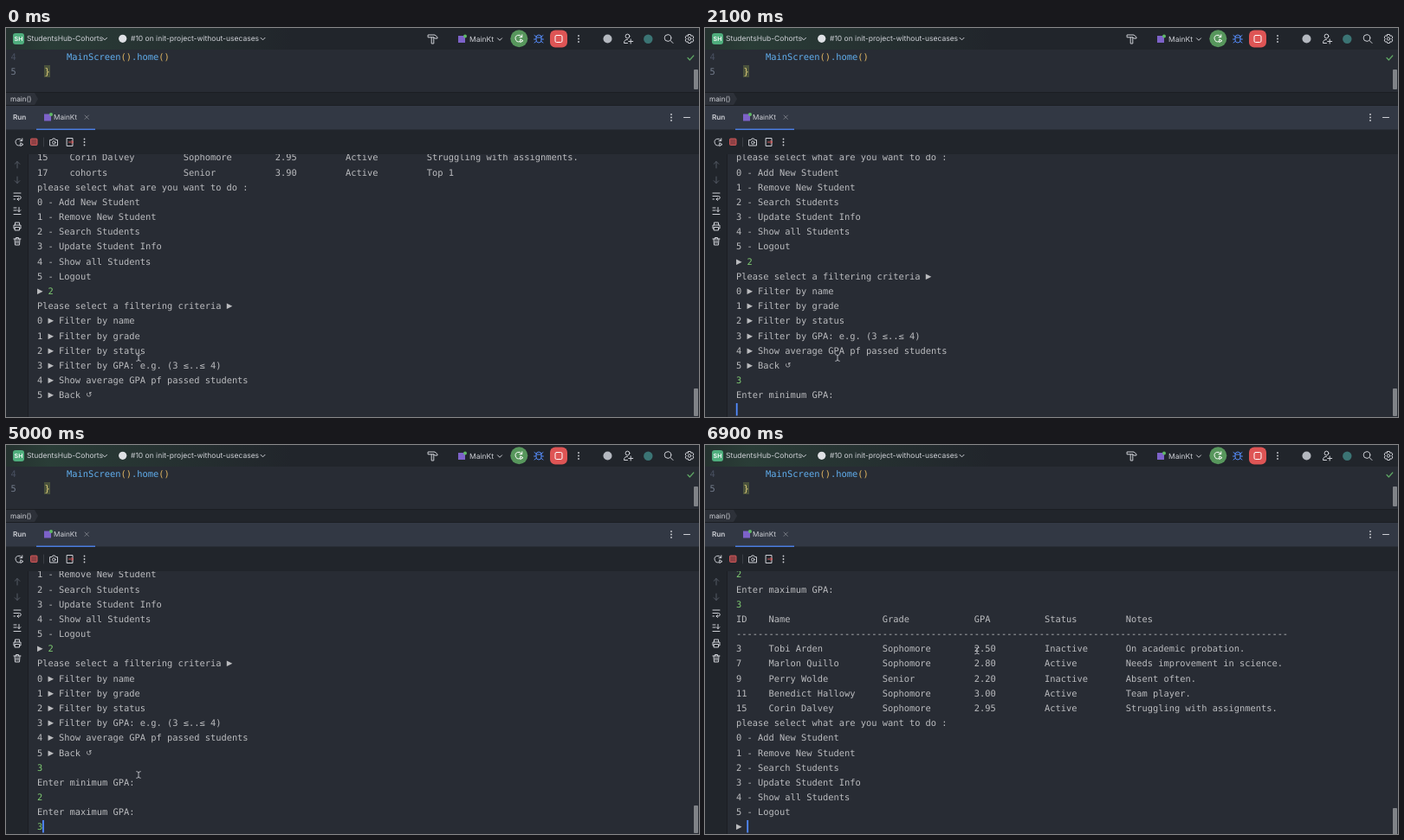
Animation, 800 px wide and 450 px high, one loop 7 s. Source, as an HTML page:

```html
<!DOCTYPE html>
<html lang="en">
<head>
<meta charset="utf-8">
<title>Console session</title>
<style>
  html, body { margin: 0; width: 100%; height: 100%; overflow: hidden; background: #282c34; }
  svg { display: block; width: 800px; height: 450px; }
  text { font: 8.2px Inter, sans-serif; fill: #ced0d6; white-space: pre; text-rendering: geometricPrecision; }
  .title { font-size: 8.5px; }
  .mono text { font: 10.38px "DejaVu Sans Mono", monospace; fill: #bbbcbf; }
  .mono .input { fill: #7fcb72; }
  .mono .symbol { font: 8.6px "DejaVu Sans", sans-serif; }
  .mono .paren { fill: #e0b561; }
  .icon { fill: none; stroke: #ced0d6; stroke-width: 1; stroke-linecap: round; stroke-linejoin: round; }
  .dots { fill: #ced0d6; }
  .thumb { fill: #808388; }
</style>
</head>
<body>
<svg viewBox="0 0 800 450">
  <defs>
    <linearGradient id="glow">
      <stop offset="0" stop-color="#25322f"/>
      <stop offset=".15" stop-color="#2a3d37"/>
      <stop offset="1" stop-color="#21252b"/>
    </linearGradient>
    <clipPath id="view"><rect x="26" y="146" width="768" height="304"/></clipPath>
    <path id="chevron" d="M-2.5-1.2 0 1.3 2.5-1.2"/>
    <g id="kebab"><circle cy="-3.5" r=".9"/><circle r=".9"/><circle cy="3.5" r=".9"/></g>
    <path id="rerun" d="M3.6-1.5A3.9 3.9 0 1 0 1 3.8M3.8-4.2v2.8H1M1.8 1.2v3.4L4.6 2.9Z"/>
    <g id="runTarget">
      <rect x="-4" y="-4" width="8" height="8" fill="#7d62c9"/>
      <circle cx="4" cy="-3.5" r="2" fill="#5fb865"/>
    </g>
  </defs>

  <!-- panels -->
  <rect width="800" height="450" fill="#282c34"/>
  <rect width="800" height="25" fill="#21252b"/>
  <rect width="330" height="25" fill="url(#glow)"/>
  <rect y="74" width="800" height="72" fill="#21252b"/>
  <rect y="90" width="800" height="27.5" fill="#323844"/>
  <rect y="146" width="25" height="304" fill="#21252b"/>
  <path d="M0 74.5H800M0 89.5H800M25.5 146V450" stroke="#1b1e23" fill="none"/>

  <!-- title bar -->
  <rect x="8" y="6" width="13" height="13" rx="3" fill="#4fae7d"/>
  <text x="9.6" y="15" style="font-size:7px;font-weight:600;fill:#fff">SH</text>
  <text class="title" x="24" y="15">StudentsHub-Cohorts</text>
  <circle cx="134.7" cy="12.3" r="4.6" fill="#dfe1e5"/>
  <text class="title" x="144" y="15">#10 on init-project-without-usecases</text>
  <use href="#runTarget" x="526" y="13"/>
  <text class="title" x="535" y="15.5">MainKt</text>
  <rect x="628" y="2.5" width="20" height="20" rx="6" fill="#de5555"/>
  <circle cx="592.3" cy="12.3" r="10" fill="#57965c"/>
  <g class="icon">
    <use href="#chevron" x="114" y="12.5"/>
    <use href="#chevron" x="296.5" y="12.5"/>
    <use href="#chevron" x="570" y="13"/>
    <path d="M487.5 8h7.5l3 2.5v1.5h-3l-1-1.2h-6.5ZM491.2 11v7h2.6v-7"/>
    <use href="#rerun" x="592" y="12" stroke="#fff"/>
    <rect x="634" y="8.500" width="8" height="8" rx="1.500" stroke="#fff"/>
    <path stroke="#548af7" d="M612 11a3 3 0 0 1 6 0v3a3 3 0 0 1-6 0ZM612 11h6M612 13h-2.5M618 13h2.5M612 10l-2-1.5M618 10l2-1.5M612 15.5l-2 1.5M618 15.5l2 1.5"/>
    <circle cx="717.5" cy="9.5" r="2.4"/>
    <path d="M717.5 17.5h-4c0-3 1.5-4.2 4-4.2M721.2 13v5M718.7 15.5h5"/>
    <circle cx="764" cy="11.5" r="3.8"/><path d="m767 14.5 3 3"/>
    <circle cx="789" cy="12.5" r="1.7"/>
    <path d="m787.7 7.5h2.6l.5 1.7 1.8-.4 1.3 2.2-1.2 1.5 1.2 1.5-1.3 2.2-1.8-.4-.5 1.7h-2.6l-.5-1.7-1.8.4-1.3-2.2 1.2-1.5-1.2-1.5 1.3-2.2 1.8.4Z"/>
    <path d="m787 34.5 2.3 2.5 4.5-5" stroke="#5fa865" stroke-width="1.2"/>
  </g>
  <use class="dots" href="#kebab" x="661" y="12.5"/>
  <circle cx="694.5" cy="12.5" r="5" fill="#b4b8bf"/>
  <circle cx="741.3" cy="12.7" r="5.2" fill="#3b7474"/>

  <!-- editor -->
  <rect x="44" y="43" width="7" height="14" fill="#4a523c"/>
  <g class="mono">
    <text x="5.5" y="36.8" style="fill:#495162">4</text>
    <text x="5.5" y="54" style="fill:#737c8c">5</text>
    <text x="70" y="36.8" style="fill:#61afef">MainScreen<tspan class="paren">()</tspan>.home<tspan class="paren">()</tspan></text>
    <text x="44.5" y="54" style="fill:#e0cf7a">}</text>
  </g>
  <rect class="thumb" x="794" y="48" width="5" height="23" rx="1"/>
  <path d="M0 75H33l4 7-4 7H0Z" fill="#2d3139"/>
  <text x="5" y="85">main()</text>

  <!-- run tool window -->
  <text x="8" y="106" style="font-weight:600">Run</text>
  <use href="#runTarget" x="48" y="103.5"/>
  <text x="55" y="106">MainKt</text>
  <rect x="35" y="116.5" width="68" height="1.5" fill="#4a7de0"/>
  <rect x="28.5" y="128" width="7.500" height="7.500" rx="1" fill="#8f4145" stroke="#d95c5c" stroke-width=".9"/>
  <g class="icon">
    <path d="m91 101 4.4 4.4m0-4.4-4.4 4.4" stroke="#868a91" stroke-width=".8"/>
    <path d="M782.5 103.5h7"/>
    <use href="#rerun" x="15" y="132"/>
    <path d="M43.5 127v10" stroke="#393d45"/>
    <path d="M51 129.5h2l1-1.5h2.5l1 1.5h2v6.5H51Z"/><circle cx="55.3" cy="132.5" r="1.7"/>
    <path d="M70.5 127.5h6.5v9h-6.5Z"/>
    <path d="M72.5 132h5m-1.8-1.8 1.8 1.8-1.8 1.8" stroke="#db5c5c"/>
    <path d="M13 162v-7.5m-2.8 2.8L13 154.5l2.8 2.8M13 172v7.5m-2.8-2.8 2.8 2.8 2.8-2.8" stroke="#545a65"/>
    <path d="M9 191h8M9 194.5h6.5a1.7 1.7 0 0 1 0 3.5H13m1.5-1.5L13 198l1.5 1.5M9 198h1.5"/>
    <path d="M9 208h3M9 211h3M9 215.5h8M15 207.5v5m-1.8-1.8 1.8 1.8 1.8-1.8"/>
    <path d="M10.5 228v-3h5v3M10.5 232H9v-4h8v4h-1.5M10.5 230.5h5v3.5h-5Z"/>
    <path d="M9 244h8M11.5 244v-1.5h3v1.5M10 244l.5 7h5l.5-7M12 246v3M14 246v3"/>
  </g>
  <g class="dots">
    <use href="#kebab" x="768" y="103.5"/>
    <use href="#kebab" x="90.5" y="132"/>
  </g>
  <g class="mono" clip-path="url(#view)">
    <g id="lines"></g>
    <rect id="caret" width="1.8" height="14.5" fill="#528bff"/>
  </g>
  <rect id="thumb" class="thumb" x="794" width="5" height="32" rx="1"/>
  <path id="pointer" class="icon" d="M-2.3-3.8Q0-3.8 0-2.5V2.5Q0 3.8-2.3 3.8M2.3-3.8Q0-3.8 0-2.5M0 2.5Q0 3.8 2.3 3.8" style="stroke-width:.8"/>
</svg>
<script>
const LOOP = 7000, LEFT = 36, CHAR = 6.25, LINE = 17.18, BASE = 153.4;
const $ = id => document.getElementById(id);
const widths = [6, 21, 17, 13, 15, 0];
const row = (...cells) => cells.map((cell, i) => cell.padEnd(widths[i])).join('');

const last = row('15', 'Corin Dalvey', 'Sophomore', '2.95', 'Active', 'Struggling with assignments.');
const menu = [
  'please select what are you want to do :',
  ...['Add New Student', 'Remove New Student', 'Search Students', 'Update Student Info', 'Show all Students', 'Logout']
    .map((item, i) => `${i} - ${item}`)
];
const filters = ['Filter by name', 'Filter by grade', 'Filter by status', 'Filter by GPA: e.g. (3 ≤..≤ 4)',
  'Show average GPA pf passed students', 'Back ↺'].map((item, i) => `${i} ▶ ${item}`);

// Text after "~" is typed input
const transcript = [
  last,
  row('17', 'cohorts', 'Senior', '3.90', 'Active', 'Top 1'),
  ...menu, '▶ ~2',
  'Please select a filtering criteria ▶', ...filters, '~3',
  'Enter minimum GPA:', '~2',
  'Enter maximum GPA:', '~3',
  row('ID', 'Name', 'Grade', 'GPA', 'Status', 'Notes'),
  '-'.repeat(102),
  row('3', 'Tobi Arden', 'Sophomore', '2.50', 'Inactive', 'On academic probation.'),
  row('7', 'Marlon Quillo', 'Sophomore', '2.80', 'Active', 'Needs improvement in science.'),
  row('9', 'Perry Wolde', 'Senior', '2.20', 'Inactive', 'Absent often.'),
  row('11', 'Benedict Hallowy', 'Sophomore', '3.00', 'Active', 'Team player.'),
  last,
  ...menu, '▶ '
];

// start (also restarts the caret blink), scrolled lines, lines shown, caret line, caret column, thumb y
const states = [
  [-750, 0, 17, 17, 0, 417],
  [1500, 0, 18, 17, 1, 417],
  [2050, 2, 19, 19, 0, 417],
  [3800, 2, 20, 19, 1, 417],
  [4300, 4, 21, 21, 0, 417],
  [4700, 4, 22, 21, 1, 417],
  [5200, 17.557, 37, 36, 2, 417.5],
  [5450, 19, 37, 36, 2, 420]
];

function svg(tag, parent, attrs, text = '') {
  const node = document.createElementNS('http://www.w3.org/2000/svg', tag);
  for (const key in attrs) node.setAttribute(key, attrs[key]);
  node.textContent = text;
  return parent.appendChild(node);
}

// Symbols come from a wider font, so every run starts on its own column
const lines = transcript.map((line, i) => {
  const node = svg('text', $('lines'), {});
  const y = BASE + i * LINE;
  let column = 0;
  for (const run of line.match(/[▶↺]|~.+|[^▶↺~]+/g)) {
    const kind = run[0] === '~' ? 'input' : /[▶↺]/.test(run) ? 'symbol' : 'output';
    const text = run.replace('~', '');
    svg('tspan', node, { class: kind, x: LEFT + column * CHAR, y: kind === 'symbol' ? y - 1 : y }, text);
    column += text.length;
  }
  return node;
});

function draw(t) {
  const [start, scroll, shown, line, column, thumbY] = states.findLast(s => s[0] <= t);
  lines.forEach((node, i) => node.style.display = i < shown ? '' : 'none');
  $('lines').setAttribute('transform', `translate(0 ${-scroll * LINE})`);
  const caretOn = (t - start) % 1000 < 500;
  $('caret').style.display = caretOn ? '' : 'none';
  $('caret').setAttribute('x', LEFT + column * CHAR - .2);
  $('caret').setAttribute('y', BASE + (line - scroll) * LINE - 11.5);
  $('thumb').setAttribute('y', thumbY);
  const p = Math.min(1, Math.max(0, (t - 6500) / 400));
  const ease = p * p * (3 - 2 * p);
  $('pointer').setAttribute('transform', `translate(${153 + 161 * ease} ${381.5 - 143.5 * ease})`);
}

const began = performance.now();
function tick() {
  draw((performance.now() - began) % LOOP);
  requestAnimationFrame(tick);
}
tick();
</script>
</body>
</html>
```
